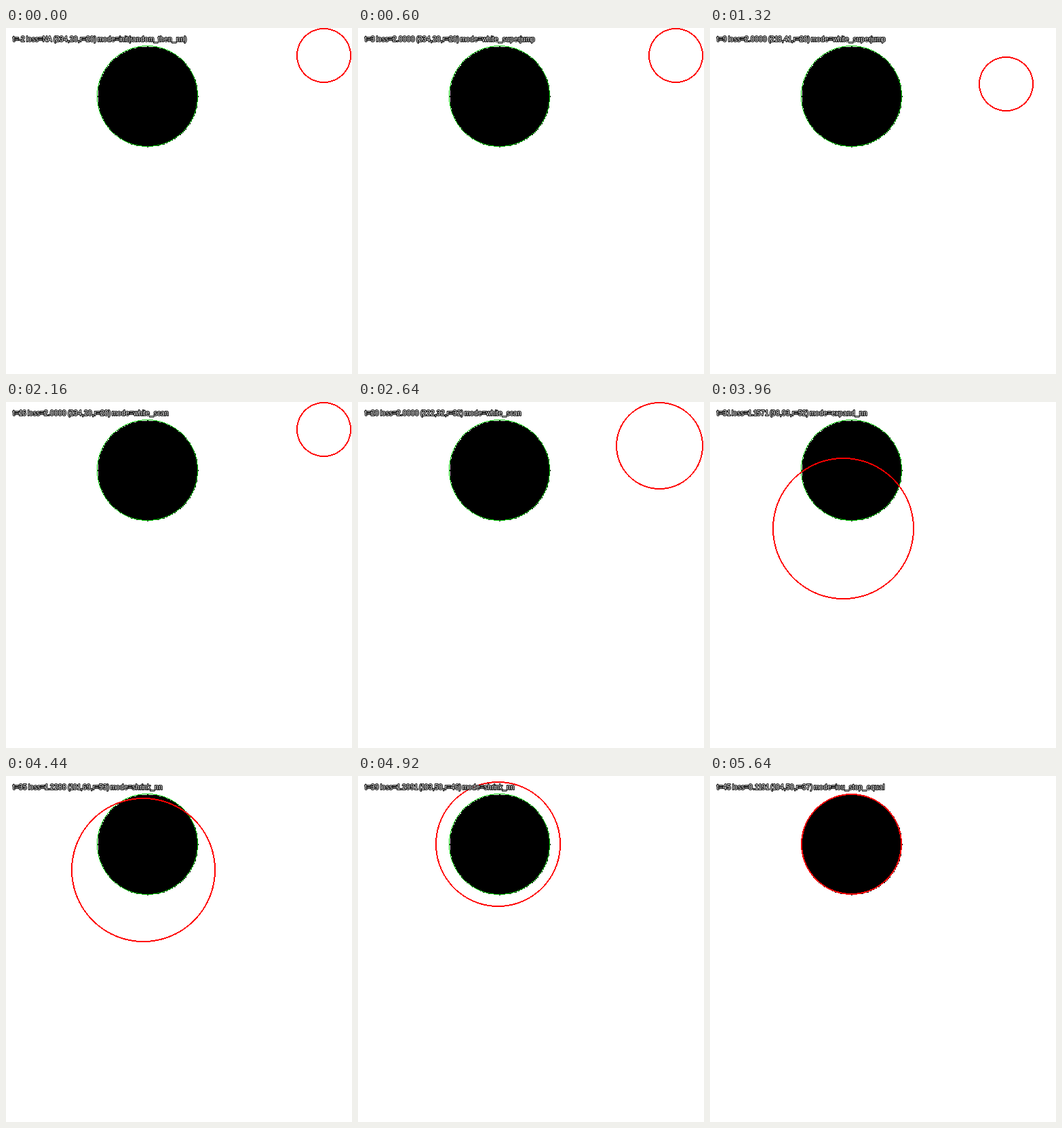
Animation of 510x510 px, one loop 8000 ms. Source, as an HTML page with a canvas:

```html
<!DOCTYPE html>
<html>
<head>
<meta charset="utf-8">
<style>
html, body { margin: 0; width: 510px; height: 510px; overflow: hidden; background: #fff; }
canvas { display: block; }
</style>
</head>
<body>
<canvas id="stage" width="510" height="510"></canvas>
<script>
const ctx = document.getElementById('stage').getContext('2d');
const LOOP = 8000, STEP = 120, FIRST = -2, LAST = 45, SCALE = 2;
const goal = { x: 104, y: 50, r: 37 };

const JUMP = 'white_superjump', SCAN = 'white_scan', GROW = 'expand_nn', SHRINK = 'shrink_nn';
// step, x, y, r, loss, mode: searching modes hold, "_nn" modes glide to the next key
const keys = [
  [-2, 234, 20, 20, 'NA', 'init(random_then_nn)'],
  [-1, 218, 41, 20, 2, JUMP],
  [1, 224, 48, 20, 2, JUMP],
  [3, 234, 20, 20, 2, JUMP],
  [5, 218, 41, 20, 2, JUMP],
  [7, 234, 20, 20, 2, JUMP],
  [9, 218, 41, 20, 2, JUMP],
  [11, 222, 52, 20, 2, JUMP],
  [13, 218, 41, 20, 2, SCAN],
  [15, 234, 20, 20, 2, SCAN],
  [18, 218, 41, 20, 2, SCAN],
  [20, 222, 32, 32, 2, SCAN],
  [22, 210, 67, 32, 2, SCAN],
  [24, 213, 41, 32, 2, SCAN],
  [26, 234, 20, 20, 2, SCAN],
  [27, 213, 41, 32, 2, GROW],
  [30, 96, 96, 50, 1.3012, GROW],
  [31, 98, 93, 52, 1.1571, GROW],
  [33, 100, 81, 55, 1.1934, GROW],
  [34, 100, 75, 54, 1.2115, SHRINK],
  [38, 103, 52, 49, 1.2806, SHRINK],
  [39, 103, 50, 46, 1.2991, SHRINK],
  [40, 104, 49, 43, 1.0627, SHRINK],
  [45, 104, 50, 37, 0.1191, 'iou_stop_equal']
];

function stateAt(step) {
  const i = keys.findLastIndex(key => key[0] <= step);
  const a = keys[i], b = keys[i + 1];
  const mode = a[5];
  const part = b && mode.endsWith('_nn') ? (step - a[0]) / (b[0] - a[0]) : 0;
  const mix = n => part ? a[n] + (b[n] - a[n]) * part : a[n];
  const loss = mix(4);
  return {
    x: Math.round(mix(1)), y: Math.round(mix(2)), r: Math.round(mix(3)),
    loss: loss === 'NA' ? loss : loss.toFixed(4), mode
  };
}

const chord = (r, dy) => Math.sqrt(r * r - dy * dy);

function disc({ x, y, r }) {
  ctx.fillStyle = '#000';
  for (let dy = -r; dy <= r; dy++) {
    const h = Math.floor(chord(r, dy));
    ctx.fillRect((x - h) * SCALE, (y + dy) * SCALE, (2 * h + 1) * SCALE, SCALE);
  }
}

// Furthest pixel of a Bresenham circle in row dy >= 0, or -1 when the row misses it
const reach = (r, dy) =>
  dy > r ? -1 : Math.max(Math.round(chord(r, dy)), Math.floor(chord(r, dy - 0.5)));

// Hard-edged outline, growing inwards
function ring({ x, y, r }, width, color) {
  const cx = x * SCALE, cy = y * SCALE, R = r * SCALE, inside = R - width + 1;
  ctx.fillStyle = color;
  for (let dy = -R; dy <= R; dy++) {
    const row = Math.abs(dy);
    const far = reach(R, row);
    const near = Math.max(0, Math.min(reach(inside, row), reach(inside, row + 1) + 1));
    const span = far - near + 1;
    ctx.fillRect(cx - far, cy + dy, span, 1);
    ctx.fillRect(cx + near, cy + dy, span, 1);
  }
}

// Bitmap-style text: every letter starts on a whole pixel, spaces and ones sit tighter
function eachLetter(text, x, paint) {
  for (const ch of text) {
    paint(ch, x);
    x += Math.round(ctx.measureText(ch).width) - (' 1'.includes(ch) ? 1 : 0);
  }
}

function label(text) {
  ctx.font = '10px "Liberation Sans", Arial, sans-serif';
  ctx.lineJoin = 'round';
  ctx.lineWidth = 2;
  ctx.strokeStyle = '#000';
  ctx.fillStyle = '#fff';
  eachLetter(text, 10, (ch, x) => ctx.strokeText(ch, x, 20));
  eachLetter(text, 10, (ch, x) => ctx.fillText(ch, x, 20));
}

function draw(now) {
  const step = Math.min(LAST, FIRST + Math.floor((now % LOOP) / STEP));
  const s = stateAt(step);
  ctx.fillStyle = '#fff';
  ctx.fillRect(0, 0, 510, 510);
  disc(goal);
  ring(goal, 1, '#00c800');
  ring(s, 2, '#f00');
  label(`t=${step} loss=${s.loss} (${s.x},${s.y},r=${s.r}) mode=${s.mode}`);
}

const start = performance.now();
function tick() {
  draw(performance.now() - start);
  requestAnimationFrame(tick);
}
tick();
</script>
</body>
</html>
```
